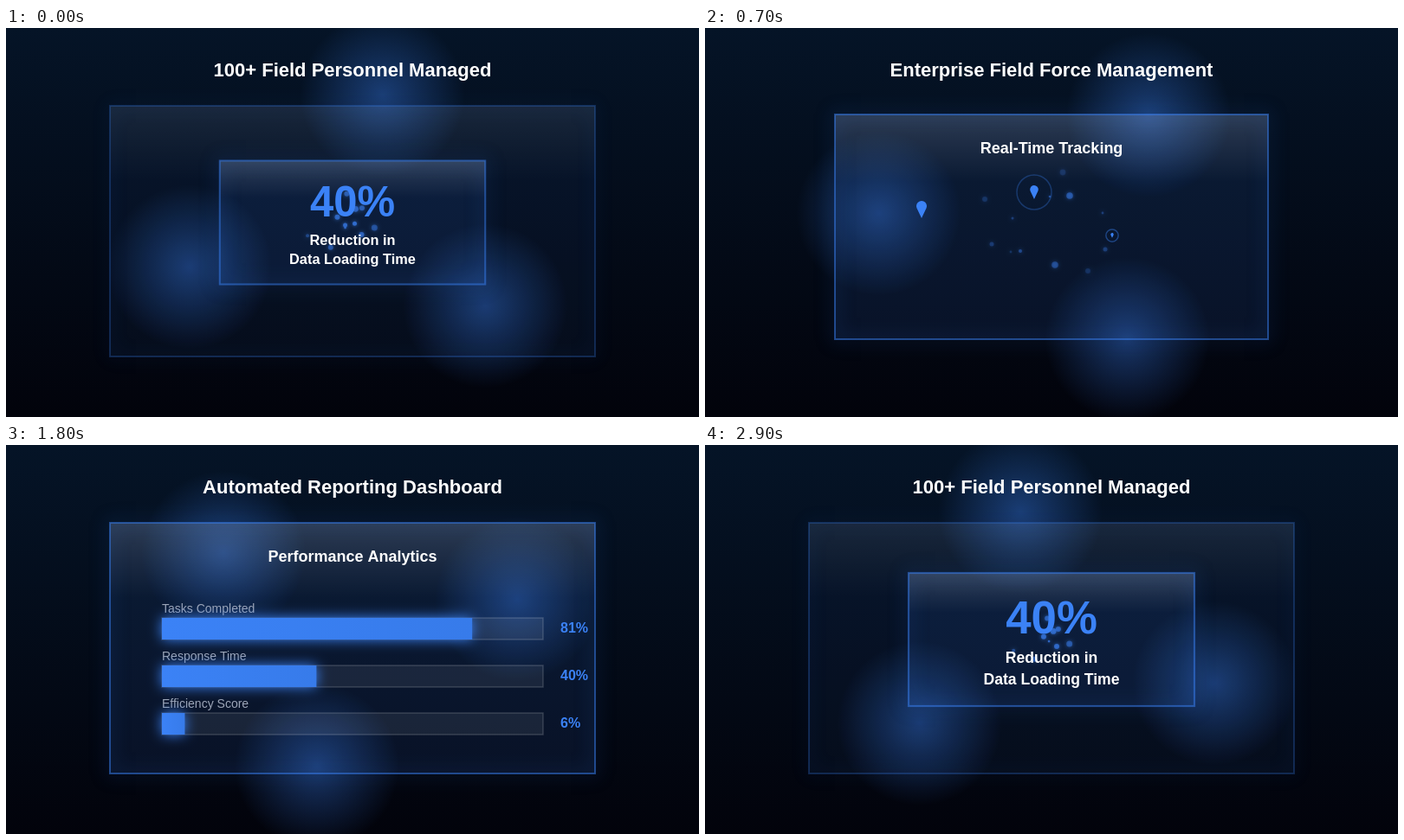
An HTML page with a canvas for the animation above (3 s loop, 800x450 px).

```html
<!DOCTYPE html>
<html lang="en">
<head>
<meta charset="utf-8">
<title>Field management</title>
<style>
  html, body { margin: 0; width: 100%; height: 100%; overflow: hidden; background: #02030b; }
  canvas { display: block; }
</style>
</head>
<body>
<canvas id="stage" width="800" height="450"></canvas>
<script>
const ctx = document.getElementById('stage').getContext('2d');
const LOOP = 3000, STEP = 100, SCENE = 1000, FIRST_CUT = 367;
const BLUE = '#3b82f6';
const blue = a => `rgba(59,130,246,${a})`;
const white = a => `rgba(255,255,255,${a})`;
const clamp = v => Math.min(1, Math.max(0, v));
const smooth = v => v * v * (3 - 2 * v);
const backOut = v => 1 + 2.70158 * (v - 1) ** 3 + 1.70158 * (v - 1) ** 2;

// Sparks fly straight out from the centre: offset at 700 ms, speed in px/s, radius
const sparks = [
  [-77, -27, 90, 3], [-69, 25, 92, 2.5], [13, -58, 62, 3.4], [33, -50, 57, 3],
  [62, 31, 95, 2.5], [4, 49, 83, 3.8], [21, -31, 85, 3.8], [-47, 34, 68, 1.4],
  [-36, 33, 90, 2], [-45, -5, 67, 1.5], [59, -11, 90, 1.4], [-2, -30, 80, 1.3],
  [-109, 32, 85, 2], [58, 14, 48, 3.5], [-19, -95, 90, 3], [-62, 71, 80, 3], [42, 56, 75, 3]
];
const pins = [[250, 210], [380, 190], [470, 240]];
const bars = [['Tasks Completed', 94], ['Response Time', 87], ['Efficiency Score', 91]];

function gradient(x0, y0, x1, y1, from, to) {
  const g = ctx.createLinearGradient(x0, y0, x1, y1);
  g.addColorStop(0, from);
  g.addColorStop(1, to);
  return g;
}

function text(str, x, y, size, color = '#fff', align = 'center', weight = 'bold') {
  ctx.font = `${weight} ${size}px "Liberation Sans", Arial, sans-serif`;
  ctx.textAlign = align;
  ctx.fillStyle = color;
  ctx.fillText(str, x, y);
}

function disc(x, y, r) {
  ctx.beginPath();
  ctx.arc(x, y, r, 0, 7);
}

function glass(x, y, w, h, alpha = 1) {
  ctx.save();
  ctx.globalAlpha = alpha;
  ctx.fillStyle = blue(0.1);
  ctx.fillRect(x, y, w, h);
  ctx.fillStyle = gradient(0, y, 0, y + h * 0.3, white(0.14), white(0));
  ctx.fillRect(x, y, w, h * 0.3);
  ctx.shadowColor = BLUE;
  ctx.shadowBlur = 20;
  ctx.strokeStyle = blue(0.5);
  ctx.lineWidth = 2;
  ctx.strokeRect(x, y, w, h);
  ctx.restore();
}

function backdrop(t) {
  ctx.fillStyle = gradient(0, 0, 0, 450, '#051427', '#02030b');
  ctx.fillRect(0, 0, 800, 450);
  for (let i = 0; i < 3; i++) {
    const angle = (40 + 120 * i) * Math.PI / 180 + t * 0.0006;
    const x = 400 + 200 * Math.cos(angle), y = 225 + 150 * Math.sin(angle);
    const g = ctx.createRadialGradient(x, y, 0, x, y, 95);
    g.addColorStop(0, blue(0.39));
    g.addColorStop(1, blue(0));
    ctx.fillStyle = g;
    ctx.fillRect(x - 95, y - 95, 190, 190);
  }
}

function drawSparks(t) {
  const clock = t > 2300 ? t - LOOP : t;
  ctx.save();
  ctx.fillStyle = ctx.shadowColor = BLUE;
  ctx.shadowBlur = 4;
  for (const [dx, dy, speed, size] of sparks) {
    const reach = Math.hypot(dx, dy);
    const r = reach - speed * (700 - clock) / 1000;
    const age = r / speed;
    if (age <= 0 || age >= 1) continue;
    ctx.globalAlpha = 0.7 * (1 - age * 0.8);
    disc(400 + dx / reach * r, 225 + dy / reach * r, size);
    ctx.fill();
  }
  ctx.restore();
}

function personnel(s) {
  text('100+ Field Personnel Managed', 400, 56, 22);
  glass(120, 90, 560, 290, 0.72 - 0.22 * clamp(s / 533));
  if (s <= 342) return;
  const scale = backOut(clamp((s - 342) / 333)) + 1.48 * smooth(clamp((s - 667) / 333));
  ctx.save();
  ctx.translate(400, 225);
  ctx.scale(scale, scale);
  glass(-150, -70, 300, 140);
  text('40%', 0, -6.5, 48, BLUE);
  text('Reduction in', 0, 25, 16);
  text('Data Loading Time', 0, 47, 16);
  ctx.restore();
}

function tracking(s) {
  text('Enterprise Field Force Management', 400, 56, 22);
  glass(150, 100, 500, 260);
  text('Real-Time Tracking', 400, 145, 18);
  pins.forEach(([x, y], i) => {
    const grow = clamp((s - 70 - 103 * i) / 200);
    if (!grow) return;
    ctx.save();
    ctx.translate(x, y);
    if (grow < 1) {
      ctx.strokeStyle = blue(0.25 + 0.25 * (1 - grow));
      ctx.lineWidth = 1.5;
      disc(0, 0, 25 * grow);
      ctx.stroke();
    }
    ctx.scale(grow, grow);
    ctx.fillStyle = BLUE;
    ctx.beginPath();
    ctx.arc(0, -4, 6, Math.PI * 0.88, Math.PI * 2.12);
    ctx.lineTo(0, 10);
    ctx.fill();
    ctx.restore();
  });
}

function reporting(s) {
  text('Automated Reporting Dashboard', 400, 56, 22);
  glass(120, 90, 560, 290);
  text('Performance Analytics', 400, 135, 18);
  bars.forEach(([label, goal], i) => {
    const value = goal * clamp((s - 200 * i) / 500);
    if (!value) return;
    const y = 200 + 55 * i, w = 4.4 * value;
    text(label, 180, y - 6, 14, '#9da6b8', 'left', 'normal');
    ctx.fillStyle = white(0.07);
    ctx.fillRect(180, y, 440, 25);
    ctx.strokeStyle = white(0.16);
    ctx.lineWidth = 1.5;
    ctx.strokeRect(180, y, 440, 25);
    ctx.save();
    ctx.shadowColor = BLUE;
    ctx.shadowBlur = 15;
    ctx.fillStyle = gradient(180, 0, 180 + w, 0, BLUE, '#377bea');
    ctx.fillRect(180, y, w, 25);
    ctx.restore();
    text(Math.floor(value) + '%', 640, y + 17, 16, BLUE, 'left');
  });
}

const scenes = [tracking, reporting, personnel];

function draw(now) {
  const t = Math.floor(now % LOOP / STEP) * STEP;
  const s = (t - FIRST_CUT + LOOP) % LOOP;
  backdrop(t);
  drawSparks(t);
  scenes[Math.floor(s / SCENE)](s % SCENE);
}

const start = performance.now();
function tick() {
  draw(performance.now() - start);
  requestAnimationFrame(tick);
}
tick();
</script>
</body>
</html>
```
